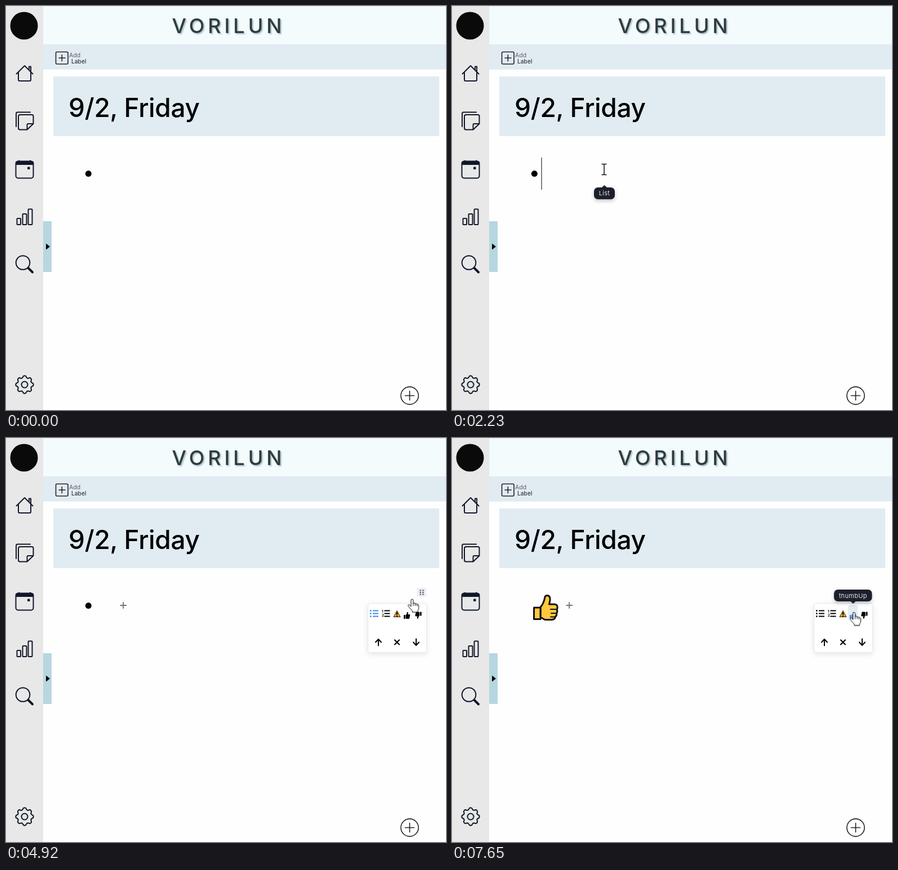
An HTML page for the animation above (8 s loop, 781 by 717 pixels).

```html
<!DOCTYPE html>
<html lang="en">
<head>
<meta charset="utf-8">
<title>Daily note editor</title>
<style>
html, body { margin: 0; width: 100%; height: 100%; overflow: hidden; background: #fefefe; }
svg { display: block; width: 100vw; height: 100vh; font-family: Inter, "Open Sans", sans-serif; }
.line { fill: none; stroke: #101828; stroke-width: 2; stroke-linecap: round; stroke-linejoin: round; }
.ink { stroke: #222; stroke-width: 1.6; }
.tip { fill: #1d202b; filter: drop-shadow(0 3px 3px rgba(13, 20, 33, .25)); }
.tip text { fill: #dfe2ec; font-size: 11px; letter-spacing: .3px; text-anchor: middle; }
.tip .key { fill: #7b7e89; font-size: 10px; }

/* One 8 s clock: 1% is 80 ms */
.step, .fade, .move { animation-duration: 8s; animation-iteration-count: infinite; }
.step { animation-timing-function: step-end; }
.fade { animation-timing-function: linear; }
.move { animation-timing-function: ease-in-out; animation-name: pointer; }

@keyframes pointer {
  0%, .75% { transform: translate(745px, 714px); }
  6.375%, 10.6% { transform: translate(191px, 290px); }
  14.4%, 20% { transform: translate(209px, 302px); }
  23.75%, 30% { transform: translate(268px, 290px); }
  36%, 38.75% { transform: translate(615px, 287px); }
  46%, 47.25% { transform: translate(727px, 281px); }
  49.4%, 58.5% { transform: translate(734px, 276px); }
  67.4%, 75% { transform: translate(674px, 314px); }
  77.25%, 89.6% { transform: translate(699.5px, 308.5px); }
  91.1%, 100% { transform: translate(712.5px, 308.5px); }
}
@keyframes press {
  0%, 10.25%, 20%, 27.5%, 38.25%, 55%, 70.1%, 83%, 95.6%, 100% { opacity: 0; }
  8.25%, 17.4%, 26.1%, 36.2%, 52.75%, 68.1%, 80.85%, 93.75% { opacity: .7; }
}
@keyframes arrow { 0%, 4.6%, 100% { opacity: 0; } .75% { opacity: 1; } }
@keyframes beam { 0%, 13.5%, 47.25%, 100% { opacity: 0; } 4.6%, 27.6% { opacity: 1; } }
@keyframes hand { 0%, 27.6% { opacity: 0; } 13.5%, 47.25%, 100% { opacity: 1; } }
@keyframes caret { 0%, 15%, 47.4%, 100% { opacity: 0; } 8.75%, 27.5% { opacity: 1; } }
@keyframes tools { 0%, 27.5% { opacity: 0; } 8.75%, 38.25%, 100% { opacity: 1; } }
@keyframes dots { 0% { opacity: 1; } 90.4%, 100% { opacity: 0; } }
@keyframes toolbox { 0%, 27.5%, 100% { opacity: 0; } 20.25% { opacity: 1; } }
@keyframes bullet { 0% { opacity: 1; } 70.1%, 100% { opacity: 0; } }
@keyframes number { 0%, 83%, 100% { opacity: 0; } 70.1% { opacity: 1; } }
@keyframes warning { 0%, 95.6%, 100% { opacity: 0; } 83% { opacity: 1; } }
@keyframes thumb { 0% { opacity: 0; } 95.6%, 100% { opacity: 1; } }
@keyframes onBullet { 0% { color: #388ae5; } 70.1%, 100% { color: #000; } }
@keyframes onNumber { 0%, 83%, 100% { color: #000; } 70.1% { color: #388ae5; } }
@keyframes onThumb { 0% { color: #000; } 95.6%, 100% { color: #388ae5; } }
@keyframes hover {
  0% { opacity: 0; transform: none; }
  66.3% { opacity: 1; transform: none; }
  76% { opacity: 1; transform: translateX(20px); }
  90.4%, 100% { opacity: 1; transform: translateX(37px); }
}
@keyframes menu {
  0%, 56.7% { opacity: 0; transform: translateY(-8px) scale(.9); }
  58%, 100% { opacity: 1; transform: none; }
}
@keyframes tipAdd { 0%, 13.8%, 21%, 100% { opacity: 0; } 15.5%, 20% { opacity: 1; } }
@keyframes tipList { 0%, 23%, 30%, 100% { opacity: 0; } 24.1%, 28.2% { opacity: 1; } }
@keyframes tipTune { 0%, 49%, 58.5%, 100% { opacity: 0; } 50.5%, 56.8% { opacity: 1; } }
@keyframes tipNumber { 0%, 67.6%, 76.5%, 100% { opacity: 0; } 69%, 75.3% { opacity: 1; } }
@keyframes tipWarning { 0%, 76%, 90.8%, 100% { opacity: 0; } 77.25%, 89.7% { opacity: 1; } }
@keyframes tipThumb { 0%, 90% { opacity: 0; } 91.1%, 100% { opacity: 1; } }
</style>
</head>
<body>
<svg viewBox="0 0 781 717" preserveAspectRatio="none">
  <defs>
    <path id="tooth" d="M-4.8-11.6Q-3.4-12.2-3-13.6Q-2.4-15.7 0-15.7Q2.4-15.7 3-13.6Q3.4-12.2 4.8-11.6"/>
    <g id="half-gear">
      <use href="#tooth"/><use href="#tooth" transform="rotate(45)"/>
      <use href="#tooth" transform="rotate(90)"/><use href="#tooth" transform="rotate(135)"/>
    </g>
    <path id="rows" d="M5 1.5H15M5 6.5H15M5 11.5H15" stroke="currentColor" stroke-width="2"/>
    <g id="bullets">
      <use href="#rows"/>
      <path d="M0 1.5H2.6M0 6.5H2.6M0 11.5H2.6" stroke="currentColor" stroke-width="2.6"/>
    </g>
    <path id="fist" fill="currentColor" d="M0 5H2.6V12H0zM3.4 5.2L5.6 2.8V.8Q5.8-.5 7-.2Q8.2.3 7.8 2.2L7.3 4H10Q11.5 4.2 11.2 5.8L10.1 10.8Q9.8 12 8.6 12H5L3.4 11z"/>
    <path id="up" class="line" d="M0 6V-5M-5 0L0-5.5L5 0" style="stroke:#000"/>
  </defs>

  <!-- Page -->
  <rect width="781" height="717" fill="#fefefe"/>
  <rect x="66" width="715" height="68" fill="#f3fbfd"/>
  <rect x="66" y="68" width="715" height="44.6" fill="#e1ebf2"/>
  <rect x="84" y="125" width="685" height="106" fill="#e1ebf2"/>
  <rect width="66" height="717" fill="#e8e8e8"/>
  <rect width="781" height="1" fill="#e4e6e7"/>
  <rect x="66" y="382" width="15" height="90" fill="#b6d7e0"/>
  <path d="M71 421.5L78 427L71 432.5z"/>
  <text x="395" y="48" text-anchor="middle" font-size="36" font-weight="500" letter-spacing="6" fill="#2f3b40"
    style="filter:drop-shadow(2px 2px 1px #a3bcc0)">VORILUN</text>
  <text x="111" y="196.5" font-size="46" font-weight="500" letter-spacing="-.3">9/2, Friday</text>

  <g class="line ink">
    <rect x="88.5" y="81.5" width="21.5" height="21.5" rx="2"/>
    <path d="M94 92.2H105M99.3 86.7V97.7"/>
    <circle cx="716.5" cy="691.5" r="15.6"/>
    <path d="M708.5 691.5H724.5M716.5 683.5V699.5"/>
  </g>
  <text x="112" y="91" font-size="10.5" fill="#5b6266">Add</text>
  <text x="116" y="102" font-size="10.3" fill="#1b1f22">Label</text>

  <!-- Sidebar -->
  <circle cx="32" cy="35" r="24.5" fill="#0a0a0a"/>
  <g class="line">
    <path d="M18.5 120.5L33 106L47.5 120.5M22 118V131Q22 133 24 133H42Q44 133 44 131V118M41 113V107.5H44V116"/>
    <path d="M18 214V191Q18 188.5 20.5 188.5H43"/>
    <path d="M25 193H46Q48.5 193 48.5 195.5V209L37.5 219.5H25Q22 219.5 22 216.5V196Q22 193 25 193zM37.5 219V211Q37.5 209 39.5 209H48"/>
    <rect x="17.5" y="275.5" width="31" height="30" rx="4"/>
    <path d="M18 277H48V281H18z" fill="#101828"/>
    <path d="M23 274.5V276M43 274.5V276"/>
    <rect x="39" y="286.5" width="2.5" height="2.5" fill="#101828"/>
    <rect x="19.5" y="377" width="6.5" height="11" rx="1"/>
    <rect x="29.5" y="369" width="7" height="19" rx="1"/>
    <rect x="39.5" y="360.5" width="7" height="27.5" rx="1"/>
    <circle cx="30" cy="455.5" r="12.3"/>
    <path d="M39.5 465L47 472.5" stroke-width="4" style="stroke-width:4"/>
    <g transform="translate(33 672)">
      <use href="#half-gear"/><use href="#half-gear" transform="rotate(180)"/>
      <circle r="5.5"/>
    </g>
  </g>

  <!-- Note line -->
  <circle class="step" style="animation-name:bullet" cx="146.3" cy="297.6" r="5.5"/>
  <text class="step" style="animation-name:number" x="137" y="316" font-size="48"
    font-family="'Noto Sans CJK JP', 'Noto Sans CJK SC', 'DejaVu Sans', sans-serif">1.</text>
  <g class="step" style="animation-name:warning">
    <path d="M164 283L185.5 321H142.5z" fill="#ffc83d" stroke="#111" stroke-width="3.5" stroke-linejoin="round"/>
    <path d="M164 294V308" stroke="#111" stroke-width="4.5"/>
    <circle cx="164" cy="314" r="2.6" fill="#111"/>
  </g>
  <g class="step" style="animation-name:thumb" fill="#ffc83d" stroke="#111" stroke-width="3" stroke-linejoin="round" stroke-linecap="round">
    <path d="M157 300Q163 294 165 282Q166 279 170 279.5Q175 281 174 288L172.5 295H182Q187 295.5 187 300Q187.5 303 186 304.5Q188 308 185.5 311Q186.5 315 183.5 317Q183 322 177 322.5H165L157 318z"/>
    <path d="M145.5 301H157V321.5H145.5z"/>
    <path d="M175 304H185M176 311H184M175 317.5H182" stroke-width="2"/>
  </g>
  <rect class="step" style="animation-name:caret" x="158.5" y="269" width="1" height="57"/>

  <!-- Block tools -->
  <g class="step" style="animation-name:tools">
    <path d="M202.5 297H214M208.2 291.2V302.8" stroke="#707684" stroke-width="2"/>
    <g class="step" style="animation-name:dots">
      <rect x="729.5" y="266" width="16.5" height="15.5" rx="1" fill="#ebeff5"/>
      <path d="M734.5 270.5H741.5M734.5 274H741.5M734.5 277.5H741.5" stroke="#4a5063" stroke-width="2.2" stroke-dasharray="2.4 2.2"/>
    </g>
  </g>
  <g class="step" style="animation-name:toolbox"><use href="#bullets" x="263" y="291" color="#707684"/></g>

  <!-- Settings menu -->
  <g class="fade" style="animation-name:menu;transform-origin:738px 293px">
    <rect x="642.5" y="293.5" width="104" height="87" rx="4" fill="#fff" stroke="#e8e8eb"
      style="filter:drop-shadow(0 3px 5px rgba(13,20,33,.1))"/>
    <rect class="step" style="animation-name:hover" x="666" y="297" width="17" height="26" rx="2" fill="#e6ecf4"/>
    <g class="step" style="animation-name:onBullet"><use href="#bullets" x="646" y="305"/></g>
    <g class="step" style="animation-name:onNumber">
      <use href="#rows" x="666.5" y="305"/>
      <text font-size="6" font-weight="700" fill="currentColor"><tspan x="667" y="310">1</tspan><tspan x="667" y="317">2</tspan></text>
    </g>
    <path d="M694 306.5L700 317.5H688z" fill="#f5a623" stroke="#2b1c00" stroke-linejoin="round"/>
    <path d="M694 309.5V313.5M694 315V316.8" stroke="#000" stroke-width="2.4"/>
    <g class="step" style="animation-name:onThumb"><use href="#fist" x="706" y="309"/></g>
    <use href="#fist" transform="translate(737.5 320.5) rotate(180)"/>
    <use href="#up" x="661" y="362.5"/>
    <use href="#up" transform="translate(728 362.5) scale(1 -1)"/>
    <path d="M690 358.5L698 366.5M698 358.5L690 366.5" stroke="#000" stroke-width="2.2" stroke-linecap="round"/>
  </g>

  <!-- Tooltips -->
  <g class="tip fade" style="animation-name:tipAdd">
    <path d="M204 322L208.5 318L213 322z"/>
    <rect x="185" y="322" width="47.5" height="37" rx="7"/>
    <text x="208.5" y="336">Add</text><text class="key" x="208.5" y="352">⇥ Tab</text>
  </g>
  <g class="tip fade" style="animation-name:tipList">
    <path d="M266 322L270.5 318L275 322z"/>
    <rect x="252" y="322" width="37" height="21" rx="7"/>
    <text x="270.5" y="336">List</text>
  </g>
  <g class="tip fade" style="animation-name:tipTune">
    <path d="M734 256L738.5 260L743 256z"/>
    <rect x="696.5" y="235" width="83.5" height="21" rx="7"/>
    <text x="738" y="249.5">Click to tune</text>
  </g>
  <g class="tip fade" style="animation-name:tipNumber">
    <path d="M670.5 287L675 291L679.5 287z"/>
    <rect x="644.5" y="266" width="60.5" height="21" rx="7"/>
    <text x="675" y="280.5">Ordered</text>
  </g>
  <g class="tip fade" style="animation-name:tipWarning">
    <path d="M689.5 287L694 291L698.5 287z"/>
    <rect x="663" y="266" width="62" height="21" rx="7"/>
    <text x="694" y="280.5">warning</text>
  </g>
  <g class="tip fade" style="animation-name:tipThumb">
    <path d="M707.5 290L712 294L716.5 290z"/>
    <rect x="678" y="269" width="67.5" height="21" rx="7"/>
    <text x="711.7" y="283.5">thumbUp</text>
  </g>

  <!-- Pointer -->
  <g class="move">
    <circle class="step" style="animation-name:press" r="17.2" fill="#ffff4d"/>
    <path class="step" style="animation-name:arrow" d="M0 0V16L3.7 12.5L6.2 18.3L8.7 17.2L6.2 11.6H11.4z" fill="#fff" stroke="#000"/>
    <path class="step" style="animation-name:beam" d="M-2.5-9.5H.5Q2-9.5 2-8Q2-9.5 3.5-9.5H6.5M2-8V8M-2.5 9.5H.5Q2 9.5 2 8Q2 9.5 3.5 9.5H6.5" fill="none" stroke="#111" stroke-width="1.5"/>
    <g class="step" style="animation-name:hand" stroke="#000" stroke-linejoin="round">
      <path d="M-.8 14V3.2Q-.8 1 1.2 1Q3.2 1 3.2 3.2V9Q3.3 7.6 5 7.8Q6.8 8 6.8 9.8Q7 8.6 8.4 8.8Q10 9 10 10.8Q10.2 9.8 11.4 10Q12.8 10.3 12.8 12V17Q12.8 19.5 11 21.5V24H1.5V21.5Q-2 18.5-5.5 13.5Q-6.8 11.5-5.2 10.8Q-3.8 10.3-2.4 12z" fill="#fff"/>
      <path d="M3.2 9V13M6.8 9.8V13M10 10.8V13.5" fill="none" stroke-width=".9"/>
    </g>
  </g>
</svg>
</body>
</html>
```
